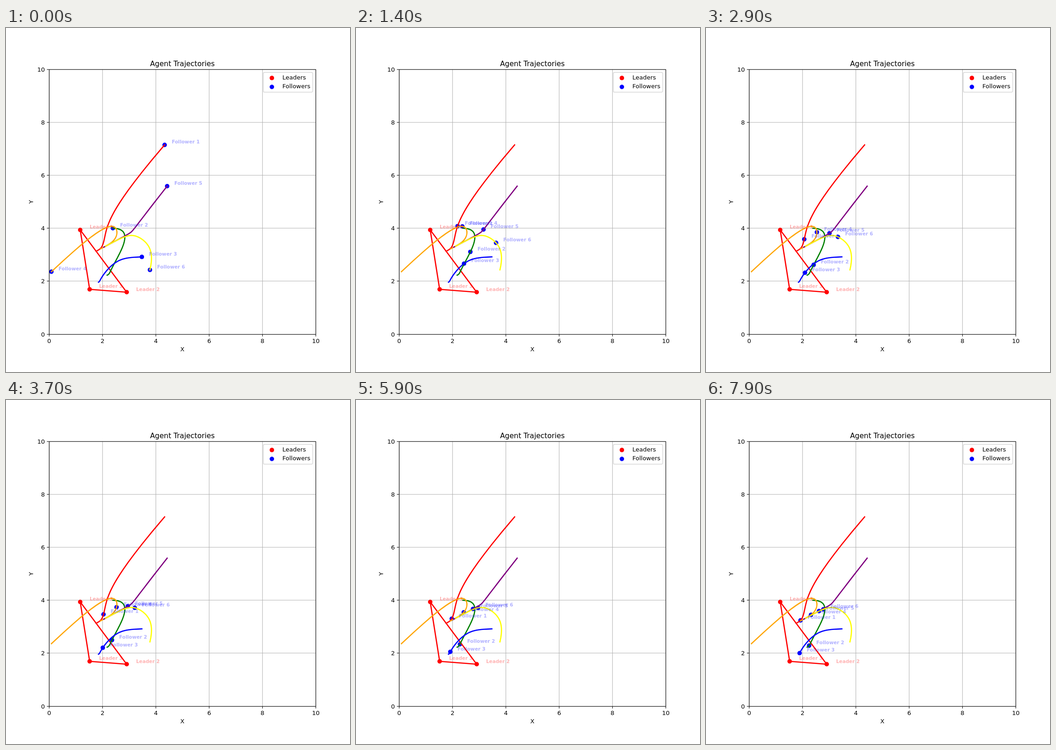
An HTML page with a canvas for the animation above (8 s loop, 748 by 748 pixels).

```html
<!DOCTYPE html>
<html lang="en">
<head>
<meta charset="utf-8">
<title>Agent Trajectories</title>
<style>
html, body { margin: 0; width: 100%; height: 100%; overflow: hidden; background: #fff; }
canvas { display: block; width: 748px; height: 748px; }
</style>
</head>
<body>
<canvas id="stage" width="748" height="748"></canvas>
<script>
const ctx = document.getElementById('stage').getContext('2d');
// The figure is laid out on an 800-unit square at 100 dpi.
const FIG = 800, PT = 100 / 72;
const LEFT = 100, RIGHT = 720, TOP = 96, BOTTOM = 712;
const FONT = '"DejaVu Sans", Verdana, sans-serif';
const DOT = 3.75 * PT, LINE = 2 * PT, THIN = 0.8 * PT;
const LOOP = 8000, STEP = 100;
const GAIN = 0.051, STEPS = 200;

const leaders = [[1.171, 3.935], [2.914, 1.585], [1.525, 1.693]];
const followers = [[4.337, 7.145], [2.396, 3.999], [3.483, 2.917],
                   [0.09, 2.358], [4.432, 5.587], [3.786, 2.427]];
const colors = ['red', 'green', 'blue', 'orange', 'purple', 'yellow'];
// Neighbours of each follower: 0-2 are the leaders, 3-8 the followers.
const neighbours = [[0, 4, 6], [1, 3, 5], [2, 4], [3, 7], [6, 8], [7]];

// Every follower moves towards its neighbours in proportion to the distance.
function advance(spots) {
  const all = [...leaders, ...spots];
  return spots.map((p, i) => p.map((v, axis) =>
    v + GAIN * neighbours[i].reduce((sum, n) => sum + all[n][axis] - v, 0)));
}

const history = [followers];
while (history.length <= STEPS) history.push(advance(history[history.length - 1]));

const toX = x => LEFT + x * (RIGHT - LEFT) / 10;
const toY = y => BOTTOM - y * (BOTTOM - TOP) / 10;
const place = ([x, y]) => [toX(x), toY(y)];
const snap = v => Math.floor(v) + 0.5;

function text(str, x, y, points, align = 'left', color = '#000', weight = '') {
  ctx.font = `${weight} ${points * PT}px ${FONT}`;
  ctx.textAlign = align;
  ctx.fillStyle = color;
  ctx.fillText(str, x, y);
}

function dot([x, y], color) {
  ctx.fillStyle = color;
  ctx.beginPath();
  ctx.arc(x, y, DOT, 0, Math.PI * 2);
  ctx.fill();
}

function stroke(points, color, width) {
  ctx.strokeStyle = color;
  ctx.lineWidth = width;
  ctx.beginPath();
  for (const [x, y] of points) ctx.lineTo(x, y);
  ctx.stroke();
}

function eachTick(fn) {
  ctx.lineCap = 'butt';
  for (let v = 0; v <= 10; v += 2) fn(snap(toX(v)), snap(toY(v)), v);
}

function drawGrid() {
  eachTick((x, y) => {
    stroke([[x, TOP], [x, BOTTOM]], '#b0b0b0', THIN);
    stroke([[LEFT, y], [RIGHT, y]], '#b0b0b0', THIN);
  });
}

function drawAxes() {
  eachTick((x, y, v) => {
    stroke([[x, BOTTOM], [x, BOTTOM + 5.4]], '#000', THIN);
    stroke([[LEFT, y], [LEFT - 4.9, y]], '#000', THIN);
    text(v, x, 732.8, 10, 'center');
    text(v, LEFT - 9.7, y + 5.3, 10, 'right');
  });
  ctx.strokeRect(LEFT + 0.5, TOP + 0.5, RIGHT - LEFT, BOTTOM - TOP);
  text('Agent Trajectories', 410.2, 88.3, 12, 'center');
  text('X', 410.2, 752, 10, 'center');
  ctx.save();
  ctx.translate(63.5, 404.3);
  ctx.rotate(-Math.PI / 2);
  text('Y', 0, 0, 10, 'center');
  ctx.restore();
}

function drawLegend() {
  ctx.beginPath();
  ctx.roundRect(598.5, 103.2, 114.6, 46, 2.8);
  ctx.fillStyle = 'rgba(255,255,255,0.8)';
  ctx.fill();
  ctx.strokeStyle = 'rgba(204,204,204,0.8)';
  ctx.lineWidth = PT;
  ctx.stroke();
  dot([618.3, 116.3], 'red');
  dot([618.3, 137], 'blue');
  text('Leaders', 642.8, 120, 10);
  text('Followers', 642.8, 140.4, 10);
}

function drawNames(name, spots, dx, color) {
  spots.forEach(([x, y], i) =>
    text(`${name} ${i + 1}`, x + dx, y - 3.1, 8, 'left', color, 'bold'));
}

function draw(frame) {
  const fixed = leaders.map(place), moving = history[frame].map(place);
  ctx.setTransform(748 / FIG, 0, 0, 748 / FIG, 0, 0);
  ctx.fillStyle = '#fff';
  ctx.fillRect(0, 0, FIG, FIG);
  drawGrid();
  fixed.forEach(p => dot(p, 'red'));
  moving.forEach(p => dot(p, 'blue'));

  ctx.lineCap = 'square';
  ctx.lineJoin = 'round';
  stroke([...fixed, fixed[0]], 'red', LINE);
  colors.forEach((color, i) => stroke(history.map(spots => place(spots[i])), color, LINE));
  drawAxes();
  drawNames('Leader', fixed, 22, 'rgba(255,0,0,0.3)');
  drawNames('Follower', moving, 16.7, 'rgba(0,0,255,0.3)');
  drawLegend();
}

const start = performance.now();
function tick() {
  const t = (performance.now() - start) % LOOP;
  draw(Math.floor(t / STEP));
  requestAnimationFrame(tick);
}
tick();
</script>
</body>
</html>
```
